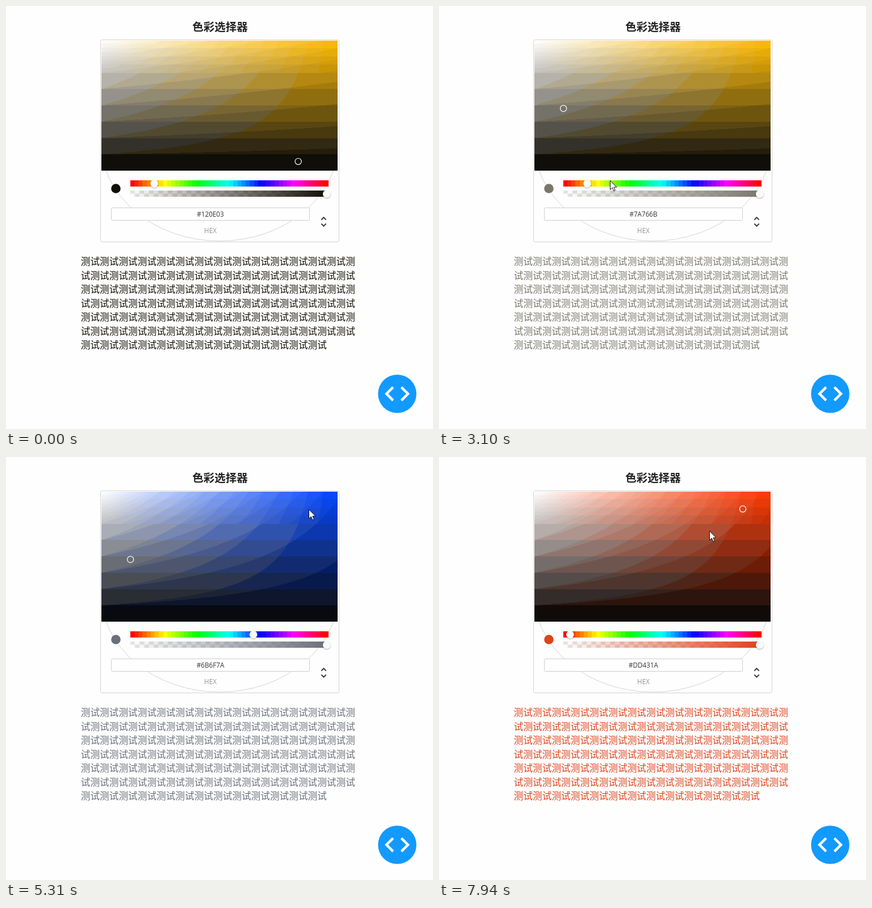
Animation of 752 by 745 pixels, one loop 8 s. Source, as an HTML page with a canvas:

```html
<!DOCTYPE html>
<html lang="zh-CN">
<head>
<meta charset="utf-8">
<style>
html, body { margin: 0; width: 100%; height: 100%; overflow: hidden; background: #fefefe; }
canvas, svg { position: absolute; left: 0; top: 0; }
canvas { left: 168px; top: 61px; }
.cjk { font-family: "Noto Sans CJK SC", "Noto Sans CJK", sans-serif; }
.latin { font-family: "Open Sans", "Noto Sans", sans-serif; font-size: 11.7px; text-anchor: middle; }
.line { fill: none; stroke: #d3d3d3; }
</style>
</head>
<body>
<canvas id="panel" width="416" height="229"></canvas>
<svg width="752" height="745" viewBox="0 0 752 745">
  <defs>
    <linearGradient id="fade">
      <stop class="tint" stop-opacity="0"/>
      <stop class="tint" offset="1"/>
    </linearGradient>
    <pattern id="checker" x="218.5" y="325" width="16.6" height="11" patternUnits="userSpaceOnUse">
      <rect width="16.6" height="11" fill="#fff"/>
      <path d="M0 0h8.3v5.5h-8.3zM8.3 5.5h8.3v5.5h-8.3z" fill="#e4e4e4"/>
    </pattern>
    <clipPath id="below"><rect x="160" y="290" width="440" height="130"/></clipPath>
    <filter id="shadow" x="-50%" y="-50%" width="200%" height="200%">
      <feDropShadow dx="0" dy="1" stdDeviation="1.3" flood-opacity=".4"/>
    </filter>
  </defs>

  <text class="cjk" x="377" y="43.5" font-size="19.5" font-weight="700" text-anchor="middle" fill="#222">色彩选择器</text>
  <rect class="line" x="166.5" y="59.5" width="420" height="356" rx="3"/>
  <ellipse class="line" cx="376.5" cy="237" rx="210" ry="177" clip-path="url(#below)"/>

  <circle id="swatch" cx="193.5" cy="321.5" r="8.3"/>
  <g id="hues" shape-rendering="crispEdges"></g>
  <rect x="218.5" y="325" width="349" height="11" fill="url(#checker)"/>
  <rect x="218.5" y="325" width="349" height="11" fill="url(#fade)"/>
  <circle id="hueKnob" cy="312.8" r="6.8" fill="#fafafa" filter="url(#shadow)"/>
  <circle cx="564.8" cy="331" r="6.8" fill="#fafafa" filter="url(#shadow)"/>

  <rect x="185.5" y="355.5" width="349" height="22" rx="2" fill="#fff" stroke="#cdcdcd"/>
  <text id="hex" class="latin" x="360" y="371.3" fill="#333"></text>
  <text class="latin" x="360" y="400" fill="#969696">HEX</text>
  <path d="M555.3 376.6l4.2-4.2 4.2 4.2M555.3 383.4l4.2 4.2 4.2-4.2" fill="none" stroke="#333" stroke-width="2"/>

  <g id="lines" class="cjk" font-size="16.66" font-weight="350"></g>

  <circle cx="689" cy="683" r="33.8" fill="#129aff"/>
  <path transform="translate(689 683) scale(2.2)" d="M-2.6 4.6L-7.2 0l4.6-4.6L-4-6l-6 6 6 6zM2.6 4.6L7.2 0 2.6-4.6 4-6l6 6-6 6z" fill="#fff"/>

  <circle id="handle" r="5.6" fill="none" stroke="#fff" stroke-width="1.2"/>
  <path id="cursor" d="M0 0V16L3.8 12.5L6.3 18.3L8.8 17.2L6.4 11.6H11.4Z" fill="#fff" stroke="#111"/>
</svg>
<script>
const LOOP = 8000;
const BOX = { x: 168, y: 61, w: 416, h: 229 };
const SLIDER = { x: 218.5, y: 313, w: 349 };
const ENTRY = { x: 628, y: 569 }, EXIT = { x: 476, y: 130 };
const NS = 'http://www.w3.org/2000/svg';
const $ = id => document.getElementById(id);

// Each pick: the cursor travels from `leave` to `arrive`, bowed by `bend`, then clicks.
const picks = [
  { click: 0, color: '#120E03' },
  { leave: 40, arrive: 540, bend: 0, click: 820, color: '#9E780F' },
  { leave: 1250, arrive: 1580, bend: 0, click: 1960, color: '#D2AF4F' },
  { leave: 1980, arrive: 2600, bend: -0.05, click: 2780, color: '#7A766B' },
  { leave: 2800, arrive: 3940, bend: 0.26, click: 4250, color: '#6B6F7A' },
  { leave: 4450, arrive: 5450, bend: -0.25, click: 5450, color: '#1A4EDD' },
  { leave: 5660, arrive: 6620, bend: -0.13, click: 6750, color: '#DD431A' }
];

function toRgb({ h, s, v }) {
  return [5, 3, 1].map(n => {
    const k = (n + h / 60) % 6;
    return 255 * v * (1 - s * Math.max(0, Math.min(k, 4 - k, 1)));
  });
}

function toHsv(hex) {
  const [r, g, b] = [1, 3, 5].map(i => parseInt(hex.slice(i, i + 2), 16));
  const max = Math.max(r, g, b), span = max - Math.min(r, g, b);
  const sector = max === r ? (g - b) / span : 4 + (r - g) / span;
  return { h: sector * 60, s: span / max, v: max / 255 };
}

const hueX = h => SLIDER.x + h / 360 * SLIDER.w;
const spot = ({ s, v }) => ({ x: BOX.x + s * BOX.w, y: BOX.y + (1 - v) * BOX.h });

// A new hue is clicked on the slider, a new shade on the panel.
function planLegs() {
  let from = ENTRY, last;
  const legs = [];
  for (const pick of picks) {
    pick.hsv = toHsv(pick.color);
    if (last) {
      const newHue = Math.abs(pick.hsv.h - last.h) > 2;
      const to = newHue ? { x: hueX(pick.hsv.h), y: SLIDER.y } : spot(pick.hsv);
      legs.push({ ...pick, from, to });
      from = to;
    }
    last = pick.hsv;
  }
  legs.push({ leave: 7100, arrive: 7940, bend: -0.12, from, to: EXIT });
  return legs;
}

function add(parent, tag, attrs, text = '') {
  const el = document.createElementNS(NS, tag);
  for (const key in attrs) el.setAttribute(key, attrs[key]);
  el.textContent = text;
  parent.append(el);
}

function build() {
  const steps = 48, w = SLIDER.w / steps;
  for (let i = 0; i < steps; i++) {
    add($('hues'), 'rect', {
      x: SLIDER.x + i * w, y: 307, width: w + 0.3, height: 11,
      fill: `hsl(${i / (steps - 1) * 360} 100% 50%)`
    });
  }
  const words = '测试'.repeat(100);
  for (let row = 0; row < 7; row++) {
    add($('lines'), 'text', { x: 131.8, y: 456 + row * 24.55 }, words.slice(row * 29, row * 29 + 29));
  }
}

// Similar colours share a band, and each band takes its mean colour.
function paintPanel(h) {
  const canvas = $('panel'), ctx = canvas.getContext('2d');
  const { width, height } = canvas;
  const img = ctx.createImageData(width, height);
  const bands = new Map(), owners = [];
  for (let y = 0; y < height; y++) {
    const v = 1 - (y + 0.5) / height;
    for (let x = 0; x < width; x++) {
      const s = (x + 0.5) / width;
      const size = v * (1 - s) > 0.75 ? 8 : v > 0.75 ? 16 : 32;
      const rgb = toRgb({ h, s, v });
      const key = rgb.reduce((k, c) => k * 32 + Math.floor(c / size), size);
      if (!bands.has(key)) bands.set(key, { sum: [0, 0, 0], count: 0 });
      const band = bands.get(key);
      rgb.forEach((c, n) => band.sum[n] += c);
      band.count++;
      owners.push(band);
    }
  }
  owners.forEach(({ sum, count }, i) => {
    img.data.set([...sum.map(c => c / count), 255], i * 4);
  });
  ctx.putImageData(img, 0, 0);
}

let shown, shownHue;
function applyPick(pick) {
  const { color, hsv } = pick;
  const hue = Math.round(hsv.h);
  if (hue !== shownHue) paintPanel(shownHue = hue);
  $('hex').textContent = color;
  $('swatch').setAttribute('fill', color);
  $('lines').setAttribute('fill', color);
  document.querySelectorAll('.tint').forEach(el => el.setAttribute('stop-color', color));
  $('hueKnob').setAttribute('cx', hueX(hsv.h));
  const { x, y } = spot(hsv);
  $('handle').setAttribute('cx', x);
  $('handle').setAttribute('cy', y);
  shown = pick;
}

function cursorAt(t) {
  const { from, to, leave, arrive, bend } = legs.filter(l => l.leave <= t).pop() || legs[0];
  const k = Math.max(0, Math.min(1, (t - leave) / (arrive - leave)));
  const u = 1 - (1 - k) ** 2.5;
  const bow = bend * 4 * u * (1 - u);
  const dx = to.x - from.x, dy = to.y - from.y;
  return [from.x + u * dx - bow * dy, from.y + u * dy + bow * dx].map(Math.round);
}

function draw(t) {
  const pick = picks.filter(p => p.click <= t).pop();
  if (pick !== shown) applyPick(pick);
  const [x, y] = cursorAt(t);
  $('cursor').setAttribute('transform', `translate(${x + 0.5} ${y + 0.5})`);
  $('cursor').setAttribute('visibility', t < legs[0].leave ? 'hidden' : 'visible');
}

const legs = planLegs();
build();
draw(0);
const start = performance.now();
function tick() {
  draw((performance.now() - start) % LOOP);
  requestAnimationFrame(tick);
}
requestAnimationFrame(tick);
</script>
</body>
</html>
```
